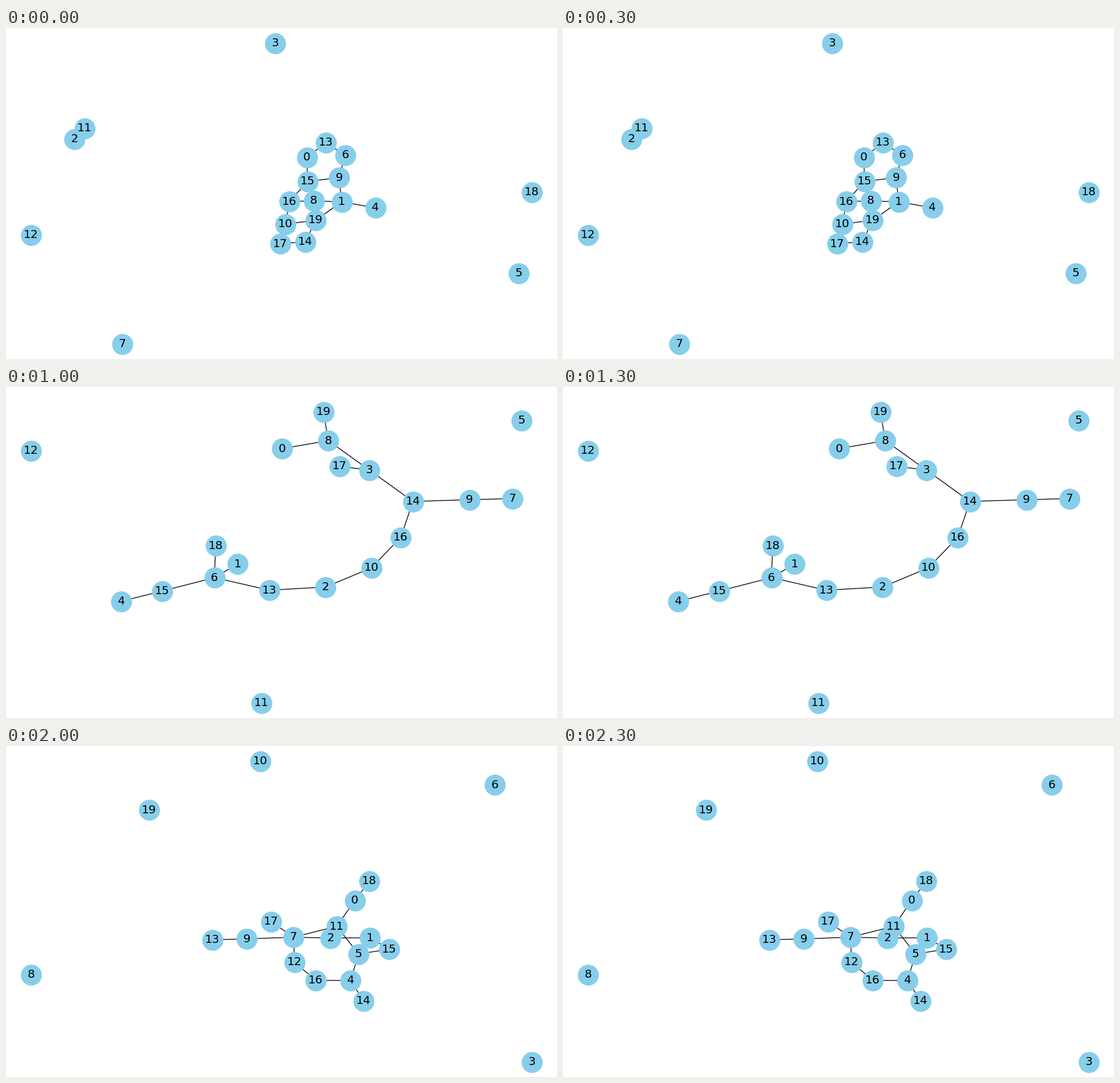
These frames come from a looping animation (966x580 px, 2500 ms). A matplotlib script:

```python
import matplotlib.pyplot as plt
from matplotlib.animation import FuncAnimation

W, H, DPI = 966, 580, 100
SCALE = 0.966  # point sizes relative to a 1000 px wide figure

fig = plt.figure(figsize=(W / DPI, H / DPI), dpi=DPI, facecolor="white")
ax = fig.add_axes([0, 0, 1, 1])


def clear_stage():
    ax.clear()
    ax.set_xlim(0, W)
    ax.set_ylim(H, 0)
    ax.axis("off")


def draw_graph(nodes, links):
    """Draw links below the discs, with each node's index on top."""
    for link in links.split():
        a, b = (nodes[int(n)] for n in link.split("-"))
        ax.plot(*zip(a, b), color="black", lw=SCALE, zorder=1)
    ax.scatter(*zip(*nodes), s=700 * SCALE**2, color="skyblue",
               linewidths=SCALE, zorder=2)
    for i, (x, y) in enumerate(nodes):
        ax.text(x, y, str(i), size=15 * SCALE, family="DejaVu Sans",
                color="black", ha="center", va="center", zorder=3)


def lattice():
    nodes = [
        (527.5, 227), (588.5, 304.5), (119.5, 195), (472, 26.5), (647.5, 315),
        (899, 429.5), (594.5, 222.5), (203.5, 553.5), (539.5, 303), (584, 262),
        (490, 343.5), (137.5, 175.5), (44, 363), (560.5, 201), (525, 374.5),
        (528.5, 269), (497, 304), (481, 378), (922, 287.5), (543, 337),
    ]
    draw_graph(nodes, "0-13 13-6 6-9 0-15 15-9 15-16 15-8 9-1 16-8 8-1 1-4 "
                      "1-19 8-19 16-10 10-19 10-17 17-14 14-19 2-11")


def long_arm():
    nodes = [
        (581, 238.5), (655.5, 263.5), (588, 553.5), (614, 227), (776, 309),
        (579, 269.5), (422.5, 26.5), (84, 259.5), (551, 277.5), (203.5, 462),
        (823, 284.5), (745, 282.5), (597.5, 190), (344, 542), (552.5, 240),
        (97, 280), (882, 288), (548, 303.5), (650.5, 196.5), (609, 260),
    ]
    draw_graph(nodes, "12-3 18-3 3-1 19-1 5-1 1-11 11-4 11-10 10-16 14-5 "
                      "0-5 0-19 5-8 8-17 7-15")


def chain():
    nodes = [
        (484, 108), (406, 310), (560, 350.5), (637, 145.5), (202, 375.5),
        (904, 58.5), (365.5, 334), (887.5, 195.5), (565, 94), (812.5, 197.5),
        (640.5, 317), (447.5, 553.5), (44, 111.5), (461.5, 356), (713.5, 200.5),
        (274, 357.5), (692, 263.5), (585, 139), (367.5, 278), (556.5, 43.5),
    ]
    draw_graph(nodes, "19-8 0-8 8-3 17-3 3-14 14-9 9-7 14-16 16-10 10-2 2-13 "
                      "13-6 6-18 6-1 6-15 15-4")


def cluster():
    nodes = [
        (641.5, 26.5), (536, 257), (922, 79.5), (582, 357), (468.5, 356),
        (380, 307.5), (489.5, 313), (555, 318), (499, 287), (44, 380),
        (454, 176.5), (610, 285.5), (597, 262), (320.5, 553.5), (482.5, 248.5),
        (622, 338.5), (608, 249.5), (458, 310), (432, 331), (491.5, 209.5),
    ]
    draw_graph(nodes, "10-19 19-1 1-16 1-12 1-6 14-8 8-17 8-7 6-7 6-17 7-11 "
                      "7-15 7-3 17-5 17-18 6-4")


def ring():
    nodes = [
        (611.5, 270.5), (638, 336), (569, 336.5), (922, 553.5), (604, 411),
        (618, 364.5), (856.5, 68), (504, 335), (44, 400.5), (422, 338),
        (445.5, 27), (580, 316), (506, 379), (361.5, 339.5), (627, 446.5),
        (672, 356), (543, 410.5), (464.5, 307.5), (637, 237), (251, 112),
    ]
    draw_graph(nodes, "18-0 0-11 11-7 11-5 7-2 2-1 1-15 5-15 5-4 4-14 4-16 "
                      "16-12 12-7 7-17 7-9 9-13")


SCENES = [lattice, long_arm, chain, cluster, ring]


def update(i):
    clear_stage()
    SCENES[i % len(SCENES)]()
    return ()


anim = FuncAnimation(fig, update, frames=len(SCENES), interval=500,
                     init_func=clear_stage, repeat=True, repeat_delay=0)
plt.show()
```
